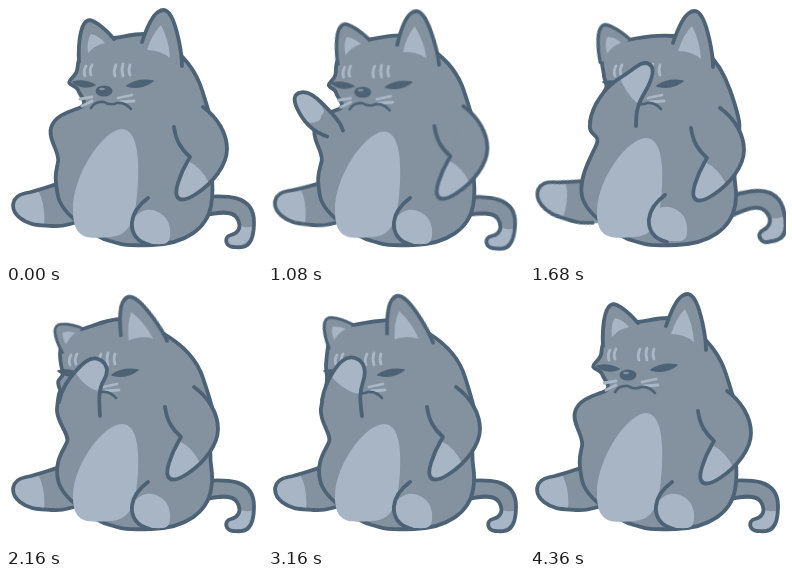
An HTML page without scripts that plays this animation: 256x256 px, repeating every 4400 ms.

```html
<!DOCTYPE html>
<html lang="en">
<head>
<meta charset="utf-8">
<title>Facepalming cat</title>
<style>
html, body { margin: 0; width: 100%; height: 100%; overflow: hidden; background: #fff; }
svg { display: block; width: 100%; height: 100%; }
.line { fill: none; }
.fur { fill: #84919f; }
.pale { fill: #a7b5c4; }
.ink { stroke: #4d6375; stroke-width: 3.8; stroke-linecap: round; stroke-linejoin: round; }
.thin { stroke-width: 2.6; }
.eye { fill: #4d6375; stroke-width: 1.6; }
.hair { fill: none; stroke: #a9b7c6; stroke-width: 2.8; stroke-linecap: round; }

.body, .arm, .paw, .lift, .earL, .earR, .face, .belly, .side, .foot, .leg, .tail {
  animation: 4.4s ease-in-out infinite;
}
.body { animation-name: body; }
.arm { animation-name: arm; }
.paw { animation-name: paw; }
.lift { animation-name: lift; animation-timing-function: step-end; }
.earL { animation-name: earL; transform-origin: 90px 44px; }
.earR { animation-name: earR; transform-origin: 156px 48px; }
.face { animation-name: face; transform-origin: 97px 84px; }
.belly { animation-name: belly; transform-origin: 104px 231px; }
.side { animation-name: side; }
.foot { animation-name: foot; }
.leg { animation-name: leg; transform-origin: 66px 195px; }
.tail { animation-name: tail; transform-origin: 200px 198px; }

/* poses in order: rest, bow, palm low, palm right, palm left, palm up */
@keyframes body {
  0%, 22.7%, 88.6%, to { d: path("M73 54C80 40 95 34 108 32S128 28 138 28S184 46 196 84S208 120 206 150S209 178 205 200S180 238 146 239S116 238 104 235S56 210 52 190S50 166 52 156S42 134 45 122S62 106 73 102S74 90 72 84S58 80 66 72S70 62 73 54Z"); }
  10.9%, 17.3% { d: path("M86 52C92 44 106 39 119 38S126 34 134 36S184 44 197 82S208 120 206 150S209 178 205 200S180 238 146 239S116 238 104 235S56 210 52 190S46 162 49 152S58 128 64 122S68 108 69 102S58 104 57 96S58 88 62 82S76 60 86 52Z"); }
  29.1%, 31.4% { d: path("M50 66C50 52 62 42 74 40S92 36 104 36S182 50 196 90S207 120 205 150S209 178 205 200S180 238 146 239S116 238 104 235S56 210 52 190S58 160 61 152S52 136 54 122S55 112 56 110S49 106 50 100S48 94 51 90S49 76 50 66Z"); }
  38.2% { d: path("M72 56C74 42 84 36 97 34S122 28 144 30S188 50 200 84S211 120 206 150S209 178 205 200S180 238 146 239S116 238 104 235S56 210 52 190S64 146 67 137S58 130 60 118S64 104 66 102S74 86 76 82S74 74 74 70S72 62 72 56Z"); }
  48.2%, 50.9%, 65% { d: path("M54 64C54 52 64 42 76 39S98 30 114 29S184 48 197 88S208 120 205 150S209 178 205 200S180 238 146 239S116 238 104 235S56 210 52 190S58 160 61 152S50 132 51 119S53 103 54 101S50 94 53 90S58 84 57 82S54 72 54 64Z"); }
  58.2%, 71.8%, 77.3% { d: path("M60 56C64 44 74 37 85 35S106 31 122 30S185 48 197 87S208 120 205 150S209 178 205 200S180 238 146 239S116 238 104 235S56 210 52 190S58 160 61 152S51 132 53 118S57 104 58 98S59 92 59 88S58 80 58 76S59 64 60 56Z"); }
}
@keyframes arm {
  0%, 17.3%, 87%, to { d: path("M74 104C60 106 48 114 46 124S44 148 54 156S70 160 72 150S74 136 76 126"); }
  22.7%, 83% { d: path("M60 134C46 132 32 124 24 112S14 92 24 90S46 100 58 110S66 116 70 122"); }
  29.1%, 31.4% { d: path("M55 114C58 104 64 92 65 82S72 66 80 69S95 84 95 100S97 122 98 136"); }
  38.2% { d: path("M60 116C62 100 74 82 90 72S112 54 119 58S122 74 115 86S106 104 106 120"); }
  48.2%, 50.9%, 65% { d: path("M53 112C56 98 62 90 69 82S84 66 92 69S104 80 98 90S93 110 94 126"); }
  58.2%, 71.8%, 77.3% { d: path("M54 110C56 98 60 90 65 82S78 65 87 68S99 80 95 92S92 110 94 126"); }
}
@keyframes paw {
  0%, 17.3%, 87%, to { d: path("M46 140C46 144 47 148 49 152S52 158 56 158S64 160 68 156S70 152 71 150S60 140 46 140Z"); }
  22.7%, 83% { d: path("M32 122C28 118 26 115 24 112S14 92 24 90S36 94 44 100S44 108 44 112S38 122 32 122Z"); }
  29.1%, 31.4% { d: path("M65 84C65 80 65 78 66 76S72 66 80 69S95 84 95 98S95 104 95 107S74 106 65 84Z"); }
  38.2% { d: path("M90 72C96 68 102 64 106 61S114 55 119 58S122 74 115 86S112 92 111 97S96 88 90 72Z"); }
  48.2%, 50.9%, 65% { d: path("M69 82C72 79 76 76 79 73S86 67 92 69S104 80 98 90S97 94 96 99S78 98 69 82Z"); }
  58.2%, 71.8%, 77.3% { d: path("M63 86C65 80 67 78 70 75S78 65 87 68S99 80 95 92S93 97 93 102S74 100 63 86Z"); }
}
@keyframes lift {
  0%, 86%, to { opacity: 0; }
  19% { opacity: 1; }
}
@keyframes earL {
  0%, 22.7%, 88.6%, to { transform: translate(0, 0) rotate(0deg) scale(1, 1); }
  10.9%, 17.3% { transform: translate(11px, 2px) rotate(-6deg) scale(.95, .82); }
  29.1%, 31.4% { transform: translate(-28px, 8px) rotate(-28deg) scale(.75, .62); }
  38.2% { transform: translate(-6px, 0) rotate(-8deg) scale(.9, .88); }
  48.2%, 50.9%, 65% { transform: translate(-25px, 6px) rotate(-26deg) scale(.78, .65); }
  58.2%, 71.8%, 77.3% { transform: translate(-18px, 2px) rotate(-18deg) scale(.83, .7); }
}
@keyframes earR {
  0%, 22.7%, 88.6%, to { transform: translate(0, 0) rotate(0deg) scale(1, 1); }
  10.9%, 17.3% { transform: translate(-6px, -1px) rotate(-20deg) scale(1, .86); }
  29.1%, 31.4% { transform: translate(-33px, 5px) rotate(-28deg) scale(1, .97); }
  38.2% { transform: translate(7px, 1px) rotate(0deg) scale(1, 1); }
  48.2%, 50.9%, 65% { transform: translate(-18px, 0) rotate(-24deg) scale(1, 1); }
  58.2%, 71.8%, 77.3% { transform: translate(-14px, 0) rotate(-20deg) scale(1, 1); }
}
@keyframes face {
  0%, 22.7%, 88.6%, to { transform: translate(0, 0) rotate(0deg); }
  10.9%, 17.3% { transform: translate(-7px, 11px) rotate(-2deg); }
  29.1%, 31.4% { transform: translate(-19px, 7px) rotate(0deg); }
  38.2% { transform: translate(6px, 0) rotate(0deg); }
  48.2%, 50.9%, 65% { transform: translate(-15px, 5px) rotate(0deg); }
  58.2%, 71.8%, 77.3% { transform: translate(-11px, 5px) rotate(0deg); }
  94% { transform: translate(0, 1px) rotate(0deg); }
}
@keyframes belly {
  0%, 22.7%, 88.6%, to { transform: scaleY(1.09); }
  10.9%, 17.3%, 38.2% { transform: scaleY(1); }
  29.1%, 31.4% { transform: scaleY(.95); }
  48.2%, 77.3% { transform: scaleY(.98); }
}
@keyframes side {
  0%, 22.7%, 88.6%, to { transform: translate(-1px, -3px); }
  10.9%, 17.3% { transform: translate(0, 0); }
  29.1%, 31.4% { transform: translate(-10px, -7px); }
  38.2% { transform: translate(-8px, -2px); }
  48.2%, 77.3% { transform: translate(-10px, -7px); }
}
@keyframes foot {
  0%, 31.4%, 46%, to { transform: translate(0, 0); }
  38.2% { transform: translate(-7px, -3px); }
}
@keyframes leg {
  0%, 17.3%, 31.4%, 46%, 77.3%, 88.6%, to { transform: rotate(0deg); }
  22.7%, 83% { transform: rotate(3deg); }
  38.2% { transform: rotate(14deg); }
}
@keyframes tail {
  0%, 17.3%, 31.4%, 46%, 77.3%, 88.6%, to { transform: rotate(0deg) scale(1); }
  22.7%, 83% { transform: rotate(3deg) scale(1); }
  38.2% { transform: rotate(-13deg) scale(1.06); }
}
</style>
</head>
<body>
<svg viewBox="0 0 256 256">
  <g class="tail">
    <path class="fur" d="M196 191C214 190 248 186 248 216S234 241 227 241S217 231 225 229S236 220 231 212S212 206 196 210Z"/>
    <path class="pale" d="M248 220C247 236 235 241 227 241S217 231 225 229S232 224 233 219Q240 223 248 220Z"/>
    <path class="line ink" d="M196 191C214 190 248 186 248 216S234 241 227 241S217 231 225 229S236 220 231 212S212 206 196 210"/>
  </g>

  <g class="leg">
    <path class="fur" d="M76 172C52 176 36 184 20 187S4 204 14 212S34 219 46 220S62 218 74 216Z"/>
    <path class="pale" d="M32 184Q26 186 20 187C9 189 4 204 14 212S28 218 38 219Q40 200 32 184Z"/>
    <path class="line ink" d="M72 173C52 176 36 184 20 187S4 204 14 212S34 219 46 220S62 218 68 217"/>
  </g>

  <path class="body fur ink" d="M73 54L138 28L206 150L146 239L52 190Z"/>
  <path class="belly pale" d="M116 132C98 132 68 172 67 204S84 232 104 231S130 216 132 180S126 132 116 132Z"/>

  <g class="side">
    <path class="fur" d="M198 104C212 114 222 130 222 146S208 180 191 191S168 196 173 180S182 160 185 154Z"/>
    <path class="pale" d="M183 158Q196 164 204 180Q198 186 191 191C180 198 168 196 173 180Q177 168 183 158Z"/>
    <path class="line ink" d="M198 104C212 114 222 130 222 146S208 180 191 191S168 196 173 180S182 160 185 154C176 146 171 138 169 124"/>
  </g>

  <g class="foot">
    <path class="pale" d="M128 212C136 202 146 202 154 207S165 220 164 230S156 238 144 238S126 230 128 212Z"/>
    <path class="line ink" d="M142 192C134 198 127 206 126 216S130 236 144 239"/>
  </g>

  <g class="earL">
    <path class="fur" d="M73 56C72 40 74 24 78 18S86 14 92 18S102 26 108 33Q102 50 73 56Z"/>
    <path class="pale" d="M82 47C81 39 82 32 85 28Q93 30 99 37Q89 39 82 47Z"/>
    <path class="line ink" d="M73 56C72 40 74 24 78 18S86 14 92 18S102 26 108 33"/>
  </g>
  <g class="earR">
    <path class="fur" d="M136 36C140 24 146 10 152 6S162 4 166 12S176 44 176 60Q150 60 136 36Z"/>
    <path class="pale" d="M141 44Q146 28 155 19Q163 34 164 52Q154 44 141 44Z"/>
    <path class="line ink" d="M136 36C140 24 146 10 152 6S162 4 166 12S176 44 176 60"/>
  </g>

  <g class="face">
    <path class="hair" d="M80 60Q77 65 79 70M86 59Q83 64 85 69M110 59Q107 65 109 70M117 58Q115 64 117 70M124 59Q122 64 124 69"/>
    <path class="hair" d="M74 93L86 91M76 100L86 95M112 92L126 89M114 96L128 95"/>
    <path class="eye ink" d="M121 80Q132 72 147 75Q136 84 121 80Z"/>
    <path class="eye ink" d="M67 76Q78 73 89 79Q76 84 67 76Z"/>
    <ellipse cx="98" cy="85" rx="8.5" ry="5.5" fill="#4d6375"/>
    <ellipse cx="96" cy="83" rx="3" ry="1.2" fill="#84919f"/>
    <path class="line ink thin" d="M85 102Q89 95 98 96Q104 100 111 97Q119 96 125 103"/>
  </g>

  <g class="lift">
    <path class="arm fur" d="M57 112L78 68L99 137"/>
    <path class="paw pale" d="M66 96L78 68L96 110Z"/>
    <path class="arm line ink" d="M57 112L78 68L99 137"/>
  </g>
</svg>
</body>
</html>
```
